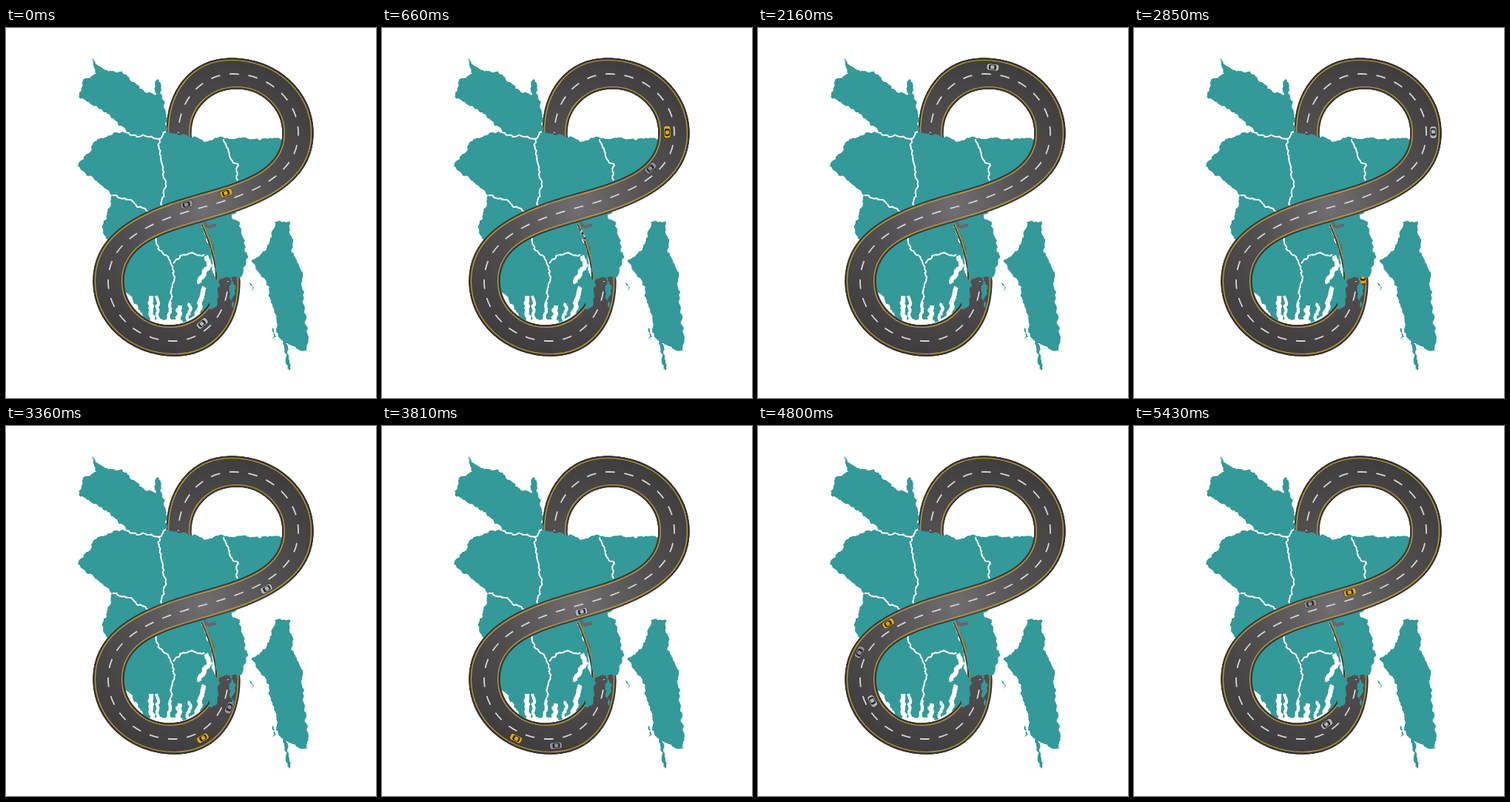
Animation of 500x500 px, one loop 5460 ms. Source, as an HTML page:

```html
<!DOCTYPE html>
<html lang="en">
<head>
<meta charset="utf-8">
<title>Road over the map</title>
<style>
  html, body { margin: 0; width: 100%; height: 100%; overflow: hidden; background: #fff; }
  svg { display: block; width: 100vw; height: 100vh; }
</style>
</head>
<body>
<svg viewBox="0 0 500 500">
  <defs>
    <radialGradient id="asphalt" gradientUnits="userSpaceOnUse" cx="266.5" cy="242" r="205">
      <stop offset="0" stop-color="#716d70"/>
      <stop offset=".5" stop-color="#524f50"/>
      <stop offset="1" stop-color="#403d3e"/>
    </radialGradient>
    <!-- half of the figure eight; the other half is the same turned by 180 degrees -->
    <path id="slab" d="M310 248C365 229 415 200 415 142C415 86 366 41 305 41C251 41 217 83 217 142H250C250 108 277 82 312 82C346 82 374 109 374 142C374 205 290 213 223 236Z"/>
    <path id="rim" d="M310 248C365 229 415 200 415 142C415 86 366 41 305 41C251 41 217 83 217 142M250 142C250 108 277 82 312 82C346 82 374 109 374 142C374 205 290 213 223 236"/>
    <g id="rims"><use href="#rim"/><use href="#rim" transform="rotate(180 266.5 242)"/></g>
    <path id="bridge" d="M300 342C300 387 268 423 226 423C178 423 138 387 138 342C138 284 203 259 266.5 242C330 225 395 200 395 142C395 97 355 62 307 62C265 62 233 97 233 142" pathLength="33.6"/>
    <path id="middle"/>
    <clipPath id="inside">
      <use href="#slab"/><use href="#slab" transform="rotate(180 266.5 242)"/>
    </clipPath>
    <!-- everything except the two stretches that dip under the map -->
    <clipPath id="above"><path d="M0 0H500V270H275V380H500V500H0V200H262V112H0Z"/></clipPath>
    <g id="road" fill="none">
      <g fill="url(#asphalt)" stroke="url(#asphalt)" stroke-width=".8">
        <use href="#slab"/><use href="#slab" transform="rotate(180 266.5 242)"/>
      </g>
      <g clip-path="url(#inside)">
        <use href="#rims" stroke="#c3a22c" stroke-width="6.2"/>
        <use href="#rims" stroke="url(#asphalt)" stroke-width="3.8"/>
      </g>
      <use href="#rims" stroke="#302e2e" stroke-width="1.2"/>
      <use href="#bridge" stroke="#d6d4d4" stroke-width="1.8" stroke-dasharray=".5 .5" stroke-dashoffset=".45"/>
    </g>
    <g id="car">
      <rect x="-9" y="-5" width="18" height="10" rx="4" fill="#222" opacity=".45"/>
      <rect x="-8" y="-4.2" width="16" height="8.4" rx="3" fill="currentColor"/>
      <rect x="-5.5" y="-3.4" width="10" height="6.8" rx="2" fill="#26282b"/>
      <rect x="-3.2" y="-2.5" width="5" height="5" rx="1" fill="currentColor"/>
    </g>
    <mask id="rivers" maskUnits="userSpaceOnUse" x="0" y="0" width="500" height="500">
      <rect width="500" height="500" fill="#fff"/>
      <g id="water" fill="none" stroke="#000" stroke-linejoin="round"></g>
    </mask>
  </defs>
  <g fill="none">
    <path fill="url(#asphalt)" d="M217 141C217 200 284 270 284 343H316C316 284 250 214 250 141Z"/>
    <path stroke="#c3a22c" stroke-width="1.3" d="M219.5 142C219.5 200 286.5 270 286.5 343M313.5 343C313.5 284 247.5 214 247.5 142"/>
    <path stroke="#302e2e" stroke-width="1.2" d="M217 142C217 200 284 270 284 342M316 342C316 284 250 214 250 142"/>
  </g>
  <use href="#road"/>
  <g id="low"></g>
  <g id="land" fill="#339999" mask="url(#rivers)"></g>
  <g clip-path="url(#above)">
    <use href="#road"/>
    <g id="high"></g>
  </g>
</svg>
<script>
const LOOP = 5460, STEP = 30, LANE = 9.5;
const $ = id => document.getElementById(id);
const add = (parent, tag, attrs) => {
  const el = document.createElementNS('http://www.w3.org/2000/svg', tag);
  for (const k in attrs) el.setAttribute(k, attrs[k]);
  return parent.appendChild(el);
};

let seed = 11;
const random = () => (seed = seed * 16807 % 2147483647) / 2147483647;

// Ragged line between two points by midpoint displacement
function split([x, y], [u, v]) {
  const len = Math.hypot(u - x, v - y);
  if (len < 3) return [[x, y]];
  const shift = (random() - .5) * Math.min(.5, 5 / len);
  const mid = [(x + u) / 2 + (v - y) * shift, (y + v) / 2 - (u - x) * shift];
  return [...split([x, y], mid), ...split(mid, [u, v])];
}
const line = pts => 'M' + pts.map(p => p.map(n => n.toFixed(1))).join('L');
function ragged(text, closed) {
  const pts = text.split(' ').map(p => p.split(',').map(Number));
  if (closed) pts.push(pts[0]);
  return line([...pts.slice(1).flatMap((p, i) => split(pts[i], p)), pts.at(-1)]);
}

// Mainland, south-east strip, islands
[
  '117,40 133,56 157,58 180,82 203,90 205,69 215,100 218,140 250,148 374,150 390,175 340,215 305,252 316,262 327,308 318,336 288,340 284,377 240,398 190,395 150,345 132,260 144,226 97,187 124,150 163,142 148,125 112,100 99,94 107,68 122,62',
  '332,316 352,298 363,262 384,262 389,305 401,330 405,395 408,437 378,426 383,463 366,405 356,350',
  '303,334 310,348 307,378 302,362', '329,343 335,351 332,355', '360,405 365,417 360,420'
].forEach(text => add($('land'), 'path', { d: ragged(text, true) }));

// Rivers by width
const rivers = {
  2: ['163,142 208,149', '217,139 208,155 216,212 208,243', '144,226 165,232 193,248',
      '294,150 303,175 314,186 313,206', '203,284 225,322 222,372', '226,318 240,306 268,306'],
  4: ['270,262 273,288 281,315 285,340', '264,268 284,267', '222,370 217,400', '203,362 207,400', '248,372 246,400'],
  6: ['270,308 273,325 262,345', '196,362 200,400', '235,375 229,400', '268,350 256,400']
};
for (const width in rivers)
  for (const text of rivers[width]) add($('water'), 'path', { d: ragged(text), 'stroke-width': width });

// The whole course: the upper road closed by the stretch below the map
const middle = $('middle');
middle.setAttribute('d', $('bridge').getAttribute('d') + 'C233 205 300 279 300 342Z');
const course = middle.getTotalLength();

// Left-hand lane as a path that begins at the given distance along the course
function lane(start, dir) {
  const pts = [];
  for (let i = 0; i <= 240; i++) {
    const s = (start + dir * i * course / 240 + course) % course;
    const p = middle.getPointAtLength(s), q = middle.getPointAtLength((s + 1) % course);
    pts.push([p.x + dir * LANE * (q.y - p.y), p.y - dir * LANE * (q.x - p.x)]);
  }
  return add(document.querySelector('defs'), 'path', { d: line(pts) });
}

const cars = [['#e6a800', 466, 1], ['#8f8f94', 410, 1], ['#b4b4b8', 73, -1]].map(([color, start, dir]) => {
  const path = lane(start, dir);
  const views = ['low', 'high'].map(id => add($(id), 'use', { href: '#car', color }));
  return { path, length: path.getTotalLength(), views };
});

function draw() {
  const t = Math.floor(performance.now() % LOOP / STEP) * STEP;
  for (const { path, length, views } of cars) {
    const s = t / LOOP * length;
    const { x, y } = path.getPointAtLength(s), next = path.getPointAtLength((s + 2) % length);
    const dx = next.x - x, dy = next.y - y;
    const turn = Math.atan2(dy, dx) * 180 / Math.PI;
    for (const el of views) el.setAttribute('transform', `translate(${x} ${y}) rotate(${turn})`);
    // near the crossing only the lower road runs from top left to bottom right
    const under = dx * dy > 0 && Math.hypot(x - 266.5, y - 242) < 90;
    views[1].setAttribute('visibility', under ? 'hidden' : 'visible');
  }
  requestAnimationFrame(draw);
}
draw();
</script>
</body>
</html>
```
